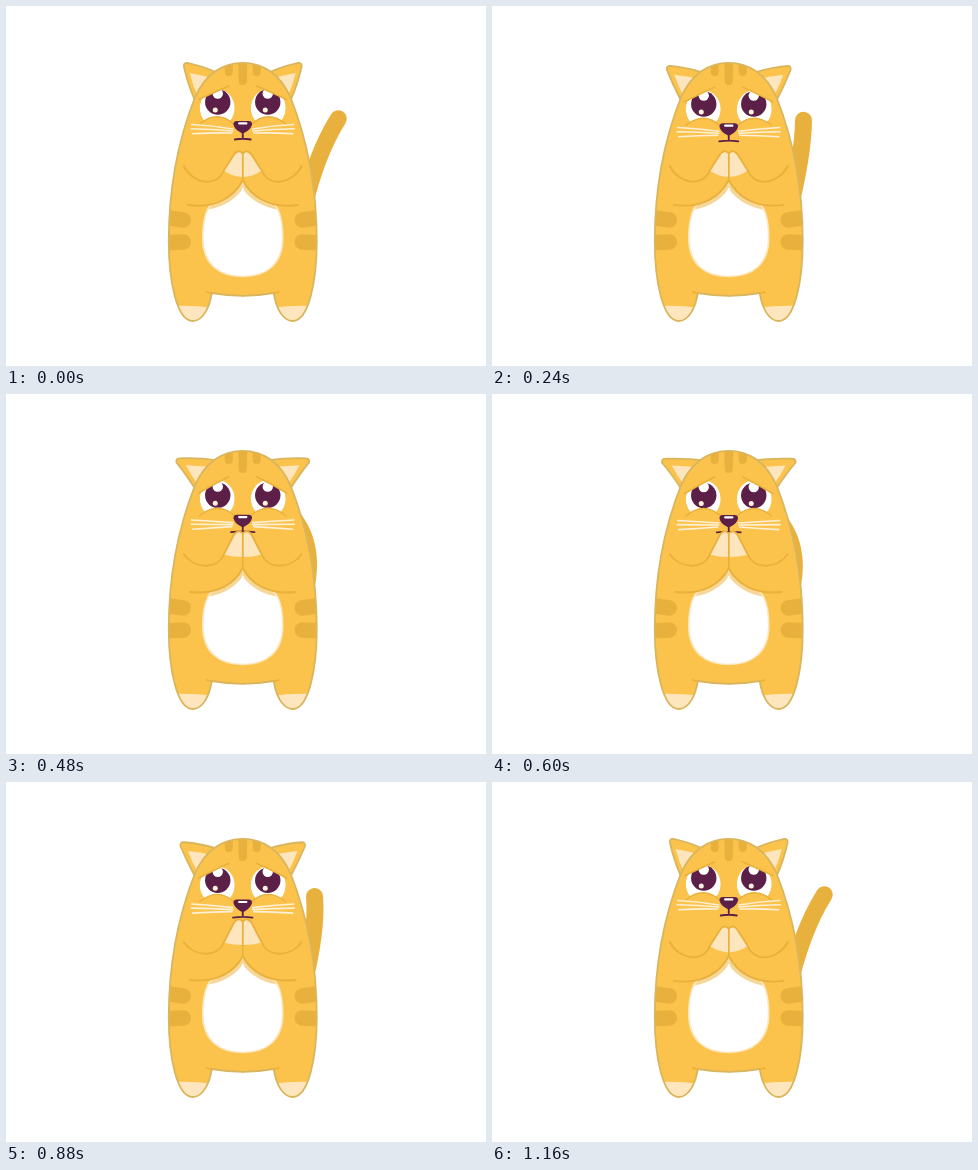
Animation, 480 px wide and 360 px high, one loop 1.2 s. Source, as an HTML page with a canvas:

```html
<!DOCTYPE html>
<html lang="en">
<head>
<meta charset="utf-8">
<title>Pleading cat</title>
<style>
  html, body { margin: 0; width: 100%; height: 100%; overflow: hidden; background: #fff; }
  canvas { display: block; }
</style>
</head>
<body>
<canvas id="stage" width="480" height="360"></canvas>
<script>
const ctx = document.getElementById('stage').getContext('2d');
const LOOP = 1200, STEP = 40, TURN = 570, AXIS = 236.75;
const FUR = '#fbc34b', DARK = '#e8b13d', LINE = '#d9b65e',
      CREAM = '#fde6bd', SHADE = '#f6d797', PLUM = '#5c1f48', WHITE = '#fff';

// x is the distance from the cat's axis; halves are mirrored when drawn
const body = new Path2D('M0 56.8C20 56.8 38 68 48 92C63 130 74 180 74 235' +
  'C74 275 66 315 50 315C39 315 33 300 31 287Q15 289.8 0 289.8');
const belly = new Path2D('M0 172C10 186 28 190 35 203C39 211 40 221 40 232' +
  'C40 258 24 270.5 0 270.5');
const foot = new Path2D('M28 302Q50 299 72 300V320H28Z');

const smooth = (a, b, t) => {
  const u = Math.min(1, Math.max(0, (t - a) / (b - a)));
  return u * u * (3 - 2 * u);
};

function fill(path, color) {
  ctx.fillStyle = color;
  ctx.fill(path);
}

function stroke(path, color, width) {
  ctx.strokeStyle = color;
  ctx.lineWidth = width;
  ctx.stroke(path);
}

function dot(x, y, r, color) {
  ctx.fillStyle = color;
  ctx.beginPath();
  ctx.arc(x, y, r, 0, Math.PI * 2);
  ctx.fill();
}

function bothSides(draw) {
  for (const side of [1, -1]) {
    ctx.save();
    ctx.scale(side, 1);
    draw(side);
    ctx.restore();
  }
}

function clipped(path, draw) {
  ctx.save();
  ctx.clip(path);
  draw();
  ctx.restore();
}

function tail(p) {
  const path = new Path2D(
    `M59 210Q${72.2 + 6 * p} 150 ${95.5 - 55 * p} ${112.8 + 4 * p}`);
  stroke(path, DARK, 17);
}

function ear(p) {
  const x = 58.5 + 8 * p, y = 56.8 + 8 * p;
  const outer = new Path2D(
    `M26 66.5Q42 ${59.5 + 4.5 * p} ${x - 3} ${y}Q${x + 1} ${y} ${x + .3} ${y + 4}` +
    `Q${55 + 3 * p} ${78 + p} 48 94`);
  fill(outer, FUR);
  stroke(outer, LINE, 1.8);
  fill(new Path2D(`M26 74Q40 ${69 + 3 * p} ${53 + 4 * p} ${67 + 4.5 * p}` +
    `Q${50 + 2 * p} ${80 + p} 44 92Z`), CREAM);
}

function torso() {
  fill(body, FUR);
  clipped(body, () => {
    stroke(new Path2D('M14 52L14 66'), DARK, 8);
    stroke(new Path2D('M80 211L59.5 214M80 237L59.5 236'), DARK, 15.5);
    fill(foot, CREAM);
  });
  stroke(body, LINE, 1.8);
  stroke(new Path2D('M36 286L31 287.5'), DARK, 1.8);
}

const armLow = q => `C8 190 26 ${203 - 2 * q} ${55 - 2 * q} ${199 - q}`;

function chest(q) {
  fill(belly, WHITE);
  clipped(belly, () => stroke(new Path2D('M0 174' + armLow(q)), SHADE, 9));
  stroke(belly, CREAM, 1.6);
}

function arm(q) {
  const up = 8 * q, side = 164.5 - 4 * q;
  const top = `M59 160C50 ${178 - 4 * q} 26 ${182 - 5 * q} 19 ${side}` +
              `L9 ${149 - up}Q5 ${143 - up} .5 ${147 - up}`;
  const low = armLow(q);
  fill(new Path2D(`${top}L-.5 ${147 - up}L-.5 174${low}Z`), FUR);
  fill(new Path2D(`M19 ${side}L9 ${149 - up}Q5 ${143 - up} .5 ${147 - up}` +
    `V${171 - up}Q10 ${171 - up} 19 ${side}Z`), CREAM);
  stroke(new Path2D(top), DARK, 1.8);
  stroke(new Path2D('M0 174' + low), DARK, 1.8);
}

function eye(p, side) {
  const lid = `M44 ${93.5 + 6 * p}Q30 ${87 + 4 * p} 14 ${80 + 3 * p}`;
  const cheek = `8 ${119 + 3 * p}Q25 ${103 + 4 * p} 43 ${118 + 4 * p}`;
  const opening = new Path2D(`${lid}L0 ${78 + 3 * p}L0 ${122 + 3 * p}L${cheek}Z`);
  const ball = new Path2D();
  ball.ellipse(25.5, 102 + 3 * p, 17.5, 19, 0, 0, Math.PI * 2);
  clipped(opening, () => clipped(ball, () => {
    const y = 96 + 5.5 * p;
    fill(ball, WHITE);
    dot(25, y, 12.7, PLUM);
    dot(25, y - 8.5, 5.2, WHITE);
    dot(25 - 2.5 * side, y + 8, 2.5, '#fff3dc');
  }));
  stroke(new Path2D(lid), DARK, 1.6);
  stroke(new Path2D('M' + cheek), DARK, 1.4);
}

function whiskers(p) {
  const a = 8 * p, b = 6 * p;
  stroke(new Path2D(
    `M10 ${123 + b}Q30 ${119.5 + a} 51 ${118.5 + a}` +
    `M10 ${125 + b}Q30 ${123 + a} 51.5 ${122.7 + a}` +
    `M11 ${127 + b}Q30 ${126.5 + a} 50 ${127.7 + a}`), '#fff0d6', 1.6);
}

function muzzle(p) {
  const y = 6 * p, w = 8 + 4 * p, m = 133 + 5 * p;
  stroke(new Path2D(`M0 ${124 + y}V${m - .5}M${-w} ${m + .5}Q0 ${m - 1} ${w} ${m + .5}`), PLUM, 1.8);
  fill(new Path2D(`M-6 ${115 + y}H6Q9.5 ${115 + y} 9.3 ${118.5 + y}` +
    `Q8 ${123.5 + y} 2.5 ${126.3 + y}Q0 ${128 + y} -2.5 ${126.3 + y}` +
    `Q-8 ${123.5 + y} -9.3 ${118.5 + y}Q-9.5 ${115 + y} -6 ${115 + y}Z`), PLUM);
  stroke(new Path2D(`M-3.6 ${117.4 + y}H3.6`), WHITE, 2.2);
}

function draw(t) {
  // p: droop of ears, face and tail; q: lift of the paws
  const p = (1 - Math.cos(Math.PI * Math.min(t / TURN, 2))) / 2;
  const q = smooth(220, 460, t) - smooth(1000, 1200, t);

  ctx.fillStyle = WHITE;
  ctx.fillRect(0, 0, 480, 360);
  ctx.save();
  ctx.translate(AXIS, 0);
  ctx.lineCap = ctx.lineJoin = 'round';

  tail(p);
  bothSides(() => ear(p));
  bothSides(torso);
  ctx.fillStyle = FUR;
  ctx.fillRect(-1, 57.6, 2, 231.2);
  fill(new Path2D('M-4.5 57.5H4.5L4 76Q3.5 79 0 79Q-3.5 79 -4 76Z'), DARK);

  bothSides(() => chest(q));
  ctx.fillStyle = WHITE;
  ctx.fillRect(-1, 182, 2, 87.5);

  bothSides(side => eye(p, side));
  bothSides(() => whiskers(p));
  muzzle(p);
  bothSides(() => arm(q));
  stroke(new Path2D(`M0 ${147.5 - 8 * q}V174`), DARK, 1.6);
  ctx.restore();
}

function tick() {
  const t = performance.now() % LOOP;
  draw(Math.floor(t / STEP) * STEP);
  requestAnimationFrame(tick);
}
tick();
</script>
</body>
</html>
```
